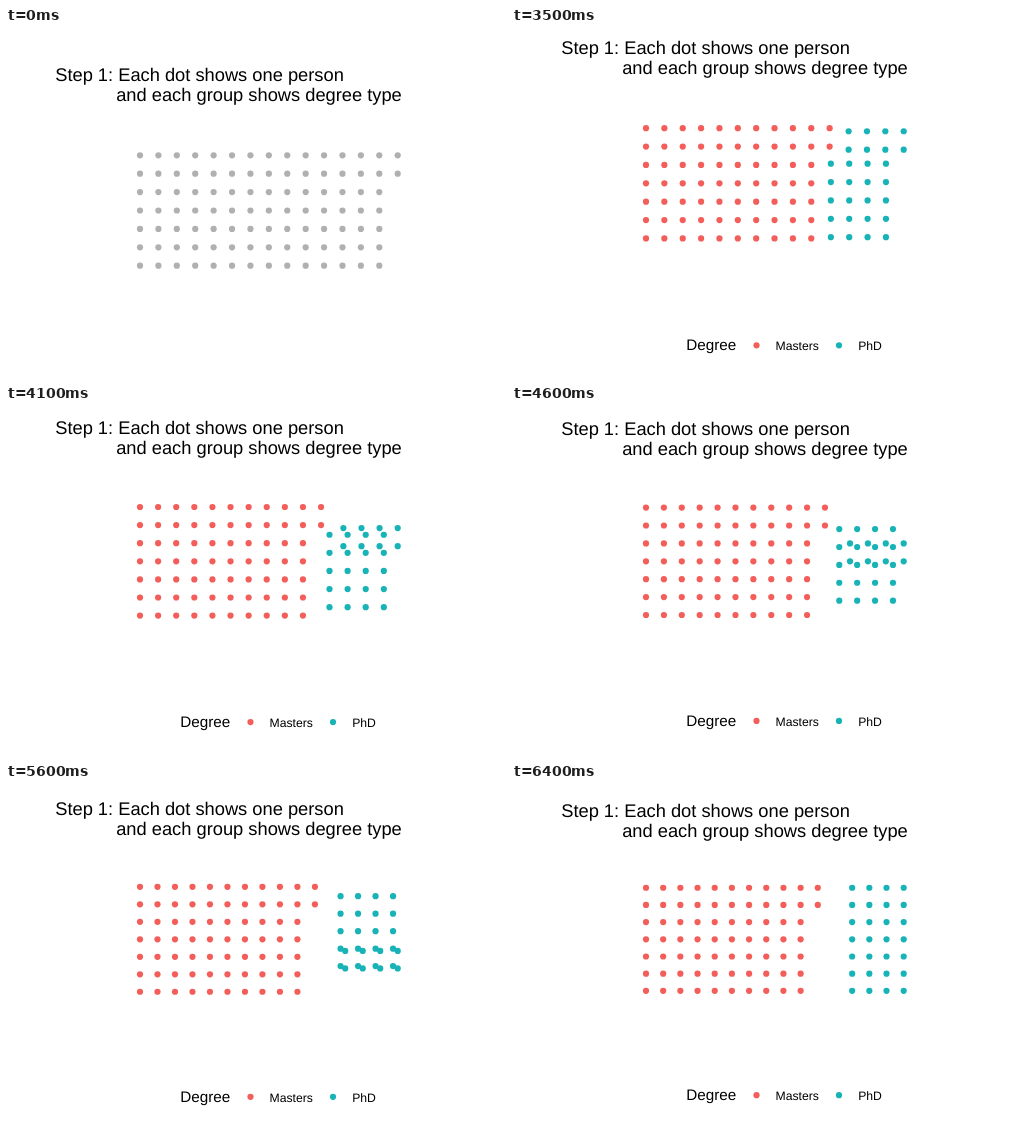
Animation of 500 by 350 pixels, one loop 8000 ms. Source, as an HTML page:

```html
<!DOCTYPE html>
<html lang="en">
<head>
<meta charset="utf-8">
<title>Degree dots</title>
<style>
  html, body { margin: 0; width: 100%; height: 100%; overflow: hidden; background: #fff; }
  svg { display: block; width: 500px; height: 350px; }
  text { font-family: "Liberation Sans", Arial, sans-serif; text-rendering: geometricPrecision; }
  .title { font-size: 18.3px; }
  .key { font-size: 15.25px; }
  .label { font-size: 12.2px; }
</style>
</head>
<body>
<svg viewBox="0 0 500 350">
  <g id="title" class="title">
    <text x="49.2" y="26.2">Step 1: Each dot shows one person</text>
    <text x="110.2" y="46.2">and each group shows degree type</text>
  </g>
  <g id="dots"></g>
  <g id="legend">
    <text class="key" x="174.2" y="322.4">Degree</text>
    <circle cx="244.5" cy="317.6" r="3.1" fill="#f35e5a"/>
    <text class="label" x="263.6" y="322.7">Masters</text>
    <circle cx="327" cy="317.6" r="3.1" fill="#17b3b7"/>
    <text class="label" x="346.2" y="322.7">PhD</text>
  </g>
</svg>
<script>
const LOOP = 8000, SPLIT = 500, MOVE = 3500, STEP = 100, STEPS = 30;
const LEFT = 134, WIDTH = 257.7, MID_Y = 155.3, INTRO_DROP = 27.2;
const GREY = '#b0b0b0', MASTERS = '#f35e5a', PHD = '#17b3b7';
const HALF_PANEL = 5.2; // half the panel height, in grid cells

const byId = id => document.getElementById(id);
const title = byId('title'), legend = byId('legend'), layer = byId('dots');

const dots = [];
function addDot(col, row, toCol, toRow, color) {
  const el = document.createElementNS('http://www.w3.org/2000/svg', 'circle');
  el.setAttribute('r', 3.1);
  layer.append(el);
  dots.push({ el, col, row, toCol, toRow, color });
}

for (let row = 0; row < 7; row++) {
  const high = row < 2;
  const masters = high ? 11 : 10;
  for (let col = 0; col < masters; col++) addDot(col, row, col, row, MASTERS);
  for (let i = 0; i < 4; i++) {
    addDot(masters + i, row, 12 + i, high ? row + 5 : row - 2, PHD);
  }
}

const shift = (el, y) => el.setAttribute('transform', `translate(0 ${y.toFixed(3)})`);

function draw(t) {
  const intro = t < SPLIT;
  const step = t < MOVE ? 0 : Math.min(STEPS, Math.floor((t - MOVE) / STEP) + 1);
  const p = step / STEPS;
  const cell = WIDTH / (14 + p);
  const drop = intro ? INTRO_DROP : 0;
  const shrink = HALF_PANEL * (WIDTH / 14 - cell);

  for (const d of dots) {
    const col = d.col + (d.toCol - d.col) * p;
    const row = d.row + (d.toRow - d.row) * p;
    d.el.setAttribute('cx', LEFT + col * cell);
    d.el.setAttribute('cy', MID_Y + drop + (row - 3) * cell);
    d.el.setAttribute('fill', intro ? GREY : d.color);
  }
  shift(title, drop + shrink);
  shift(legend, -shrink);
  legend.setAttribute('visibility', intro ? 'hidden' : 'visible');
}

const start = performance.now();
function tick() {
  draw((performance.now() - start) % LOOP);
  requestAnimationFrame(tick);
}
tick();
</script>
</body>
</html>
```
